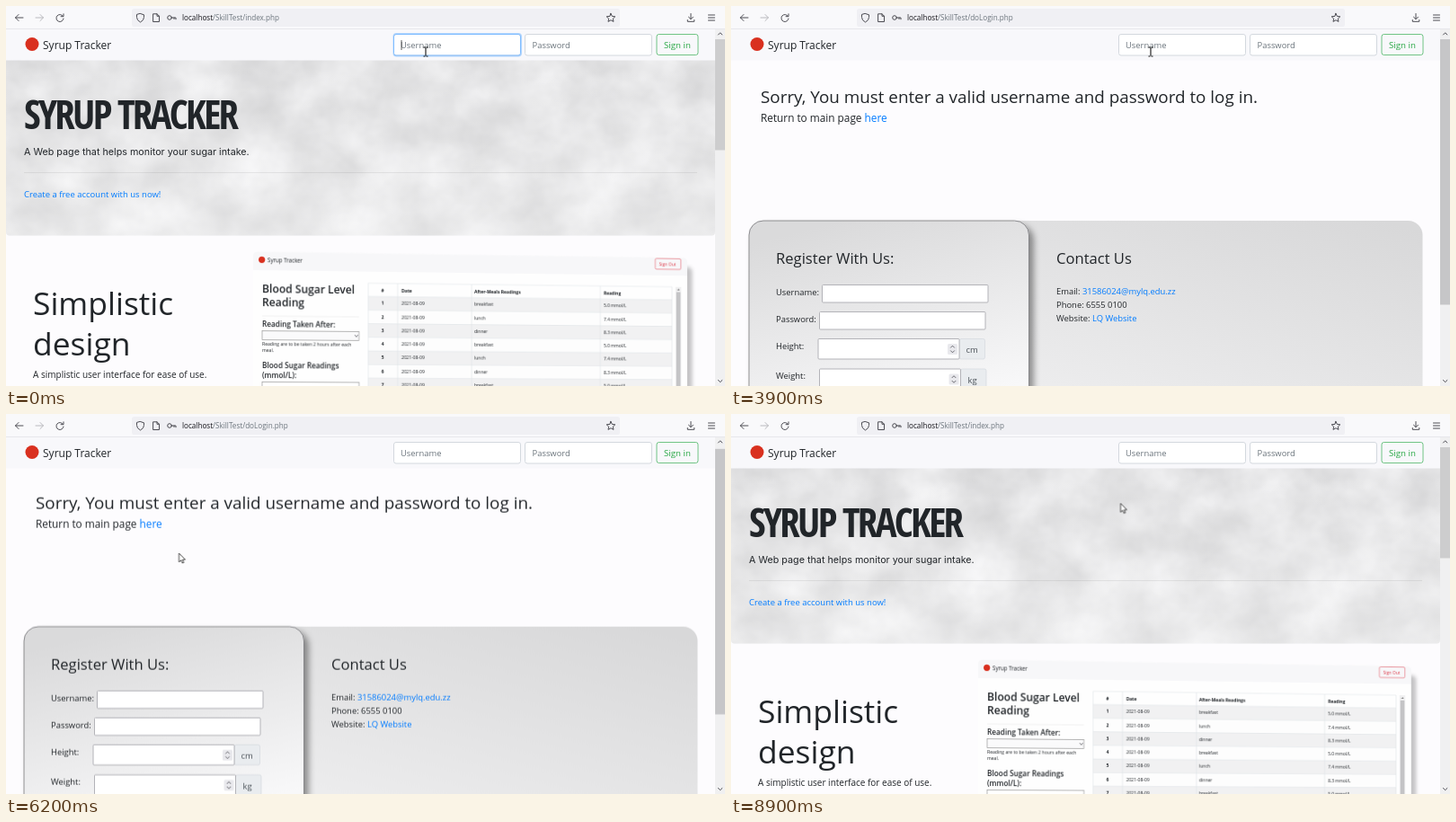
Recreate the animation shown at these times as an HTML page. Size 800x423 px, loop 9 s.

```html
<!DOCTYPE html>
<html lang="en">
<head>
<meta charset="utf-8">
<title>Syrup Tracker</title>
<style>
html, body { margin: 0; width: 100%; height: 100%; overflow: hidden; background: #fdfcfe; }
svg { position: absolute; left: 0; top: 0; width: 800px; height: 423px; overflow: visible; }
text { font: 9.42px "Open Sans", "Noto Sans", sans-serif; fill: #212529; white-space: pre; }
.h2 { font-size: 18.83px; }
.h3 { font-size: 16.6px; }
.lead { font-size: 11.8px; }
.big { font-size: 35.4px; }
.note { font-size: 10px; }
.hero { font: 700 45px "Open Sans Condensed", "Roboto Condensed", "Open Sans", Roboto, sans-serif; font-stretch: condensed; letter-spacing: -.06em; }
.tag { font: 10.75px Inter, sans-serif; }
.link { fill: #007bff; }
.url { font-size: 8.15px; fill: #15141a; }
.hint { fill: #6c757d; }
.typed { fill: #495057; }
.box { fill: #fff; stroke: #d3d8de; }
.field { fill: #fff; stroke: #b3b3b8; }
.icon { fill: none; stroke: #4c4c53; stroke-linecap: round; stroke-linejoin: round; }
#shot text { font-size: 5.1px; }
#shot .b { font-weight: 700; }
#shot .title { font-size: 12.2px; font-weight: 600; }
#shot .sub { font-size: 8.3px; font-weight: 600; }
#shot .name { font-size: 6.2px; }

.login, .home, .focusU, .focusP, .hintU, .hintP, .caret, .k, .ibeam, .arrow, .hand { animation: 9s step-end infinite; }
.login { animation-name: login; }
.home { animation-name: home; }
.focusU { animation-name: focusU; }
.focusP { animation-name: focusP; }
.hintU { animation-name: hintU; }
.hintP { animation-name: hintP; }
.caret { animation-name: caret; }
.ibeam { animation-name: ibeam; }
.arrow { animation-name: arrow; }
.hand { animation-name: hand; }
.reveal { animation: reveal 9s linear infinite; }
.scroll { animation: scroll 9s linear infinite; }
.thumb { animation: thumb 9s linear infinite; }
.cursor { animation: move 9s linear infinite; }
#shot { transform-origin: 275px 480px; animation: tilt 9s linear infinite, reveal 9s linear infinite; }

@keyframes login { 0% { opacity: 0 } 38.33% { opacity: 1 } 76.11%, to { opacity: 0 } }
@keyframes home { 0% { opacity: 1 } 38.33% { opacity: 0 } 76.11%, to { opacity: 1 } }
@keyframes focusU { 0% { opacity: 1 } 20.5%, to { opacity: 0 } }
@keyframes focusP { 0% { opacity: 0 } 20.5% { opacity: 1 } 38.33%, to { opacity: 0 } }
@keyframes hintU { 0% { opacity: 1 } 7.2% { opacity: 0 } 38.33%, to { opacity: 1 } }
@keyframes hintP { 0% { opacity: 1 } 23.8% { opacity: 0 } 38.33%, to { opacity: 1 } }
@keyframes k1 { 0% { opacity: 0 } 7.2% { opacity: 1 } 38.33%, to { opacity: 0 } }
@keyframes k2 { 0% { opacity: 0 } 9.4% { opacity: 1 } 38.33%, to { opacity: 0 } }
@keyframes k3 { 0% { opacity: 0 } 11.6% { opacity: 1 } 38.33%, to { opacity: 0 } }
@keyframes k4 { 0% { opacity: 0 } 13.8% { opacity: 1 } 38.33%, to { opacity: 0 } }
@keyframes p1 { 0% { opacity: 0 } 23.8% { opacity: 1 } 38.33%, to { opacity: 0 } }
@keyframes p2 { 0% { opacity: 0 } 25.5% { opacity: 1 } 38.33%, to { opacity: 0 } }
@keyframes p3 { 0% { opacity: 0 } 27.2% { opacity: 1 } 38.33%, to { opacity: 0 } }
@keyframes caret {
  0% { opacity: 1; transform: none }
  5.5% { opacity: 0; transform: none }
  7.2% { opacity: 1; transform: translateX(4px) }
  9.4% { opacity: 1; transform: translateX(9px) }
  11.6% { opacity: 1; transform: translateX(14px) }
  13.8% { opacity: 1; transform: translateX(20px) }
  19.4% { opacity: 0; transform: translateX(20px) }
  20.5% { opacity: 1; transform: translateX(146px) }
  23.8% { opacity: 1; transform: translateX(152px) }
  25.5% { opacity: 1; transform: translateX(158px) }
  27.2% { opacity: 1; transform: translateX(164px) }
  32.7%, to { opacity: 0; transform: translateX(164px) }
}
@keyframes reveal { 0%, 38.32% { opacity: 1 } 38.33%, 81% { opacity: 0 } 92%, to { opacity: 1 } }
@keyframes tilt {
  0%, 76% { transform: perspective(1000px) rotateY(4deg) }
  81% { transform: perspective(1000px) rotateY(10deg); animation-timing-function: cubic-bezier(.2, .7, .5, .95) }
  to { transform: perspective(1000px) rotateY(4.2deg) }
}
@keyframes scroll {
  0%, 59.44% { transform: none; animation-timing-function: ease }
  63.33%, 65.78% { transform: translateY(-97.5px); animation-timing-function: ease }
  69.67%, to { transform: none }
}
@keyframes thumb {
  0%, 59.44% { transform: none; animation-timing-function: ease }
  63.33%, 65.78% { transform: translateY(78px); animation-timing-function: ease }
  69.67%, to { transform: none }
}
@keyframes move {
  0%, 48.33% { transform: translate(467px, 51px); animation-timing-function: ease-in-out }
  53.89%, 70.56% { transform: translate(192.5px, 155px); animation-timing-function: ease-in-out }
  73.33%, 76.1% { transform: translate(159px, 126px) }
  77.5%, 88.89% { transform: translate(159px, 131px); animation-timing-function: ease-in-out }
  96.67%, to { transform: translate(433.5px, 99.5px) }
}
@keyframes ibeam { 0% { opacity: 1 } 49.1% { opacity: 0 } 76.11% { opacity: 1 } 91.1%, to { opacity: 0 } }
@keyframes arrow { 0% { opacity: 0 } 49.1% { opacity: 1 } 73% { opacity: 0 } 91.1%, to { opacity: 1 } }
@keyframes hand { 0% { opacity: 0 } 73% { opacity: 1 } 76.11%, to { opacity: 0 } }
</style>
</head>
<body>

<svg class="home" viewBox="0 0 800 423">
  <defs>
    <filter id="smoke" x="0" y="0" width="1" height="1" color-interpolation-filters="sRGB">
      <feTurbulence type="fractalNoise" baseFrequency=".016 .019" numOctaves="4" seed="4"/>
      <feColorMatrix values=".18 0 0 0 .8  .18 0 0 0 .8  .18 0 0 0 .805  0 0 0 0 1"/>
    </filter>
    <linearGradient id="haze" x2="0" y2="1">
      <stop stop-color="#fff" stop-opacity="0"/>
      <stop offset="1" stop-color="#fff" stop-opacity=".3"/>
    </linearGradient>
    <clipPath id="band"><rect y="50" width="789" height="205.5" rx="4"/></clipPath>
  </defs>
  <g clip-path="url(#band)">
    <rect y="60" width="789" height="196" filter="url(#smoke)"/>
    <rect y="60" width="789" height="196" fill="url(#haze)"/>
  </g>
  <path d="M20 185.5H769" stroke="#000" stroke-opacity=".1" stroke-width=".7"/>
  <text class="hero" x="20" y="136.5">SYRUP TRACKER</text>
  <text class="tag" x="20" y="166">A Web page that helps monitor your sugar intake.</text>
  <text class="link" x="20" y="212.6" style="font-size:9.5px">Create a free account with us now!</text>
  <g class="reveal">
    <text class="big" x="30" y="344">Simplistic</text>
    <text class="big" x="30" y="389">design</text>
    <text class="note" x="30" y="413.5">A simplistic user interface for ease of use.</text>
  </g>
</svg>

<svg id="shot" viewBox="0 0 800 423">
  <defs><filter id="soft" x="-10%" y="-10%" width="120%" height="120%"><feGaussianBlur stdDeviation="2"/></filter></defs>
  <rect x="290" y="284" width="492" height="240" rx="5" fill="#000" fill-opacity=".22" filter="url(#soft)"/>
  <rect x="275" y="273.5" width="501" height="245" rx="5" fill="#fefefe"/>
  <path d="M275 294V278q0-4.5 5-4.5H771q5 0 5 4.5V294z" fill="#f7f7f9"/>
  <circle cx="284.7" cy="282.3" r="3.6" fill="#d9301f"/>
  <text class="name" x="291" y="285">Syrup Tracker</text>
  <rect x="738" y="274.6" width="30.5" height="12.3" rx="1.5" fill="none" stroke="#dc3545" stroke-width=".5"/>
  <text x="742.5" y="282.8" style="fill:#dc3545">Sign Out</text>
  <text class="title" x="285" y="319.5">Blood Sugar Level</text>
  <text class="title" x="285" y="334.5">Reading</text>
  <path d="M285 345H394" stroke="#000" stroke-opacity=".1" stroke-width=".6"/>
  <text class="sub" x="285" y="357.5">Reading Taken After:</text>
  <rect x="285" y="361.5" width="109" height="10" fill="#fafafb" stroke="#888" stroke-width=".6"/>
  <path d="M389.5 365.5l1.5 2 1.5-2" class="icon" style="stroke-width:.7"/>
  <text x="285" y="378">Reading are to be taken 2 hours after each</text>
  <text x="285" y="385">meal.</text>
  <text class="sub" x="285" y="403.5">Blood Sugar Readings</text>
  <text class="sub" x="285" y="414">(mmol/L):</text>
  <rect x="285" y="418.5" width="109" height="10" fill="#fff" stroke="#888" stroke-width=".6"/>
  <g id="rows"></g>
</svg>

<svg viewBox="0 0 800 423">
  <defs>
    <linearGradient id="left" gradientUnits="userSpaceOnUse" x1="140" y1="235" x2="205" y2="490">
      <stop stop-color="#dadadb"/><stop offset="1" stop-color="#fdfdfe"/>
    </linearGradient>
    <linearGradient id="right" gradientUnits="userSpaceOnUse" x1="620" y1="210" x2="540" y2="500">
      <stop stop-color="#d8d8d9"/><stop offset="1" stop-color="#eeeeef"/>
    </linearGradient>
    <filter id="drop" x="-10%" y="-10%" width="125%" height="125%">
      <feDropShadow dx="5" dy="5" stdDeviation="3.5" flood-opacity=".4"/>
    </filter>
  </defs>

  <g class="login">
    <g class="scroll">
      <text class="h2" x="33" y="107.5">Sorry, You must enter a valid username and password to log in.</text>
      <text class="lead" x="33" y="129">Return to main page <tspan class="link">here</tspan></text>
      <rect x="20" y="239" width="749.5" height="252" rx="16" fill="url(#right)"/>
      <rect x="20" y="239" width="311.5" height="252" rx="16" fill="url(#left)" stroke="#77777a" stroke-width=".8" filter="url(#drop)"/>
      <text class="h3" x="50" y="287">Register With Us:</text>
      <text x="50" y="321.5">Username:</text>
      <rect class="field" x="101.5" y="310.5" width="184.5" height="19.5" rx="1"/>
      <text x="50" y="351.7">Password:</text>
      <rect class="field" x="98.5" y="340.5" width="184.5" height="19.5" rx="1"/>
      <text x="50" y="381.7">Height:</text>
      <text x="50" y="415.2">Weight:</text>
      <g id="unit">
        <rect x="254" y="370.5" width="28.5" height="22.5" rx="2" fill="#e9ecef" stroke="#d5d9de" stroke-width=".7"/>
        <rect class="field" x="97" y="370.5" width="157" height="22.5" rx="1"/>
        <rect x="241" y="376" width="11" height="12" rx="1.5" fill="#e9e9ed"/>
        <path class="icon" d="M244.5 380.2l2-2 2 2M244.5 383.8l2 2 2-2" style="stroke-width:.8"/>
      </g>
      <use href="#unit" x="1.5" y="33.5"/>
      <text class="typed" x="261.5" y="386">cm</text>
      <text class="typed" x="263.5" y="419.5">kg</text>
      <rect x="50" y="437.5" width="51" height="23.5" rx="2.5" fill="#007bff"/>
      <text x="58" y="453" style="fill:#fff">Sign Up</text>
      <text class="h3" x="362" y="287">Contact Us</text>
      <text x="362" y="321.2">Email: <tspan class="link">31586024@mylq.edu.zz</tspan></text>
      <text x="362" y="336.3">Phone: 6555 0100</text>
      <text x="362" y="351.3">Website: <tspan class="link">LQ Website</tspan></text>
    </g>
  </g>

  <!-- site bar -->
  <rect y="25" width="789" height="35.5" fill="#f8f8fb"/>
  <circle cx="29" cy="42.5" r="7.5" fill="#d9301f"/>
  <text x="41" y="48" style="font-size:12px">Syrup Tracker</text>
  <g class="focusU"><rect x="430.5" y="30" width="143.5" height="26.5" rx="4" fill="#b3d7ff"/></g>
  <g class="focusP"><rect x="576.5" y="30" width="143.5" height="26.5" rx="4" fill="#b3d7ff"/></g>
  <rect class="box" x="431.5" y="31.5" width="141" height="23.5" rx="2.5"/>
  <rect class="box" x="577.5" y="31.5" width="141" height="23.5" rx="2.5"/>
  <g fill="none" stroke="#80bdff">
    <rect class="focusU" x="431.5" y="31.5" width="141" height="23.5" rx="2.5"/>
    <rect class="focusP" x="577.5" y="31.5" width="141" height="23.5" rx="2.5"/>
  </g>
  <text class="hint hintU" x="439" y="47.3">Username</text>
  <text class="hint hintP" x="585.5" y="47.3">Password</text>
  <g id="typing"></g>
  <path class="caret" d="M440 38V49" stroke="#333" stroke-width=".8"/>
  <rect x="724" y="31.5" width="46" height="23" rx="2.5" fill="none" stroke="#28a745" stroke-width=".65"/>
  <text x="732" y="47.3" style="font-size:9.7px;fill:#28a745">Sign in</text>

  <!-- scrollbar -->
  <rect x="789" y="25" width="11" height="398" fill="#f0f0f1"/>
  <rect class="home" x="789" y="37" width="11" height="123.5" fill="#cdcdce"/>
  <g class="login"><rect class="thumb" x="789" y="37" width="11" height="295.5" fill="#c6c6c8"/></g>
  <path class="icon" d="M792.5 32l2.2-2.2 2.2 2.2M792.5 416.5l2.2 2.2 2.2-2.2"/>

  <!-- browser bar -->
  <rect width="800" height="25.5" fill="#f9f9fb"/>
  <path d="M0 25.5H800" stroke="#e3e3e8" stroke-width=".8"/>
  <rect x="140" y="3" width="543" height="20" rx="2.5" fill="#f0f0f4"/>
  <g class="icon">
    <path d="M19 13H10.5M14 9.5L10.5 13l3.5 3.5"/>
    <path d="M33 13h8.5M38 9.5l3.5 3.5-3.5 3.5" stroke="#b9b9be"/>
    <path d="M63.5 11.5a4 4 0 1 0 .5 2.5M64 8.8v2.9h-2.9"/>
    <path d="M149.5 8.5l4 1.3v2.7q0 3.5-4 5.5-4-2-4-5.5V9.8z"/>
    <path d="M164 8.8h4l2.5 2.5V17.5h-6.5zM168 8.8v2.5h2.5"/>
    <circle cx="182" cy="13" r="2.3"/>
    <path d="M184.3 13H189v1.8M187 13v1.5"/>
    <path d="M673 8.3l1.4 3.1 3.4.4-2.5 2.3.7 3.3-3-1.7-3 1.7.7-3.3-2.5-2.3 3.4-.4z"/>
    <path d="M762 8.5v6M759.5 12.2l2.5 2.5 2.5-2.5M758.3 15.5v1.8h7.5v-1.8"/>
    <path d="M781.5 10h7M781.5 13h7M781.5 16h7"/>
  </g>
  <text class="url home" x="196" y="16">localhost<tspan class="hint">/SkillTest/index.php</tspan></text>
  <text class="url login" x="196" y="16">localhost<tspan class="hint">/SkillTest/doLogin.php</tspan></text>

  <g class="cursor">
    <path class="ibeam" d="M-2.5-5H-.6M.6-5H2.5M-2.5 5H-.6M.6 5H2.5M0-4.5V4.5" fill="none" stroke="#111" stroke-width="1.1"/>
    <path class="arrow" d="M0 0V9.8L2.3 7.7 3.8 11 5.4 10.3 3.9 7.1H7z" fill="#fff" stroke="#222" stroke-width=".8"/>
    <path class="hand" d="M-1 0q1-1 2 0V4l4 .8q1.2.4 1 1.7L5 11H0L-3.5 6.5q0-1.5 1.5-.8l1 .8z" fill="#fff" stroke="#222" stroke-width=".8"/>
  </g>
</svg>

<script>
const meals = [["breakfast", "5.0"], ["lunch", "7.4"], ["dinner", "8.3"]];
const cols = [421, 442.3, 525.9, 676.9];
const line = (d) => `<path d="${d}" fill="none" stroke="#dee2e6" stroke-width=".6"/>`;

function row(cells, y, bold) {
  return cells.map((c, i) =>
    `<text x="${cols[i]}" y="${y + 1.8}" class="${bold || !i ? "b" : ""}" text-anchor="${i ? "start" : "middle"}">${c}</text>`).join("");
}

let table = row(["#", "Date", "After-Meals Readings", "Reading"], 314.8, true);
for (let i = 0; i < 8; i++) {
  const y = 329.5 + 15.3 * i, [meal, level] = meals[i % 3];
  const fill = i % 2 ? "#fdfdfd" : "#f1f1f2";
  table += `<rect x="404.5" y="${y - 7.6}" width="353.5" height="15.3" fill="${fill}"/>`
    + line(`M404.5 ${y - 7.6}H758`)
    + row([i + 1, "2021-08-09", meal, level + " mmol/L"], y);
}
table += line("M404.5 470V307H758V470M438 307V470M523 307V470M673 307V470");
table += '<rect x="762" y="307" width="7" height="160" fill="#f0f0f1"/><rect x="763" y="313" width="5" height="110" fill="#c4c4c6"/>'
  + '<path d="M764 311l1.5-2 1.5 2z" fill="#666"/>';
document.getElementById("rows").innerHTML = table;

// each longer prefix covers the one before it
const word = "tavo";
let typed = "";
for (let i = 1; i <= word.length; i++)
  typed += `<text class="typed k" style="animation-name:k${i}" x="${439}" y="47.3">${word.slice(0, i)}</text>`;
for (let i = 1; i <= 3; i++)
  typed += `<circle class="k" style="animation-name:p${i}" cx="${582 + 6 * i}" cy="43.8" r="2.4" fill="#495057"/>`;
document.getElementById("typing").innerHTML = typed;
</script>
</body>
</html>
```
